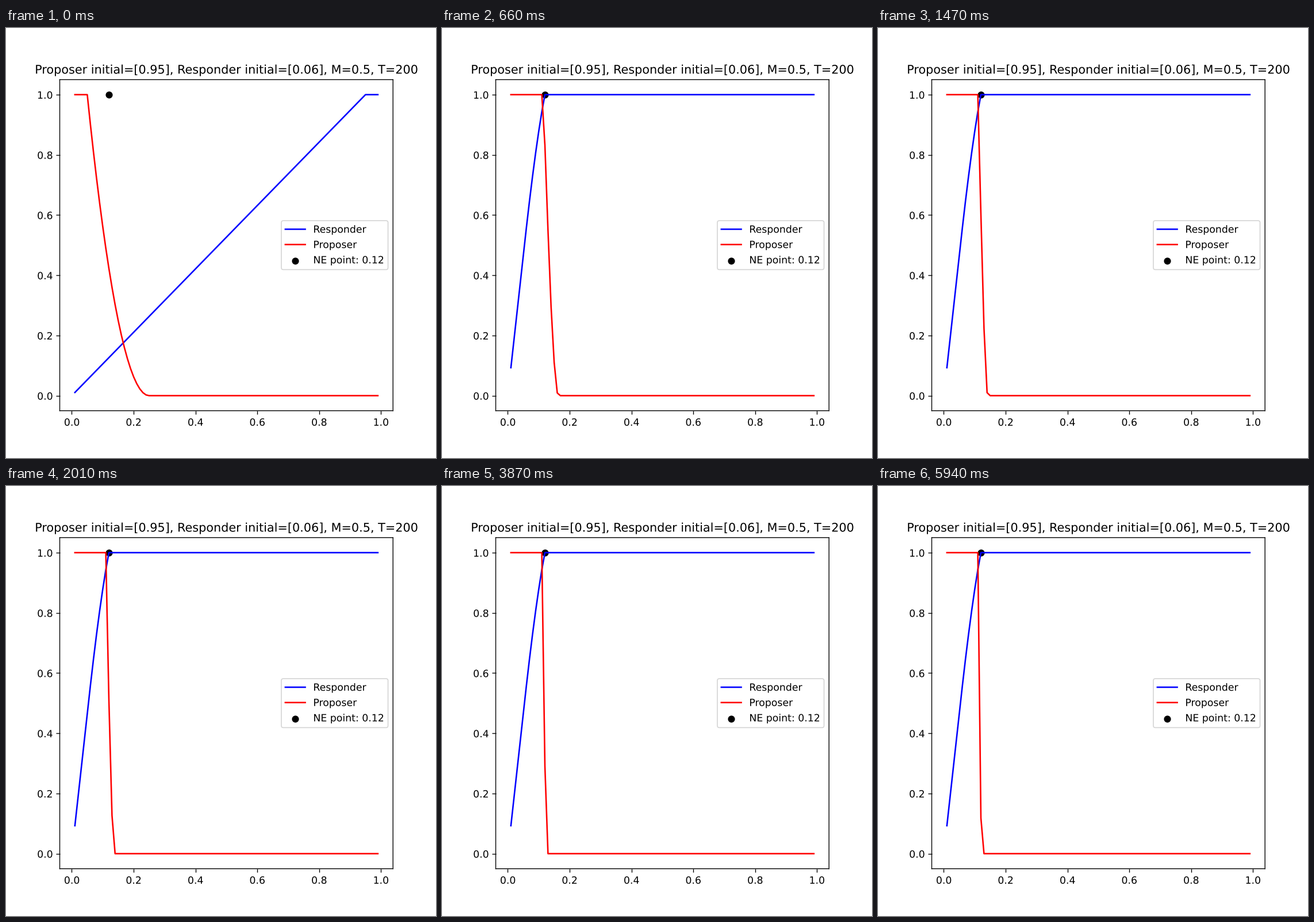
A matplotlib script for the animation above (5970 ms loop, 748 by 748 pixels).

```python
import numpy as np
import matplotlib.pyplot as plt
from matplotlib.animation import FuncAnimation
from matplotlib.patheffects import Normal

SIZE, INCHES = 748, 6
T, M = 200, 0.5
OFFER, THRESHOLD = 0.95, 0.06
NE = 0.12

grid = np.arange(1, 100) / 100


def project(v):
    """Euclidean projection onto the probability simplex."""
    u = np.sort(v)[::-1]
    shift = (np.cumsum(u) - 1) / np.arange(1, len(u) + 1)
    k = np.nonzero(u > shift)[0][-1]
    return np.maximum(v - shift[k], 0)


def pure(value):
    p = np.zeros(len(grid))
    p[round(value * 100) - 1] = 1
    return p


def play():
    """Regularised-leader learning in the ultimatum game."""
    prop, resp = pure(OFFER), pure(THRESHOLD)
    gain_p, gain_r = np.zeros(len(grid)), np.zeros(len(grid))
    accept, exceed = [], []
    for _ in range(T - 1):
        gain_p += (1 - grid) * np.cumsum(resp)
        gain_r += np.cumsum((prop * grid)[::-1])[::-1]
        prop, resp = project(M * gain_p), project(M * gain_r)
        accept.append(np.cumsum(resp))
        exceed.append(1 - np.cumsum(prop))
    return accept, exceed


accept, exceed = play()

# Place outlines and glyphs at sub-pixel positions.
plt.rcParams.update({
    "font.family": "DejaVu Sans",
    "path.snap": False,
    "path.effects": [Normal()],
})
fig, ax = plt.subplots(figsize=(INCHES, INCHES), dpi=SIZE / INCHES)
blue, = ax.plot(grid, accept[0], color="blue", label="Responder")
red, = ax.plot(grid, exceed[0], color="red", label="Proposer")
ax.scatter([NE], [1], color="black", label=f"NE point: {NE}")
ax.set_xlim(-0.039, 1.039)
ax.set_ylim(-0.05, 1.05)
ax.set_title(f"Proposer initial=[{OFFER}], Responder initial=[{THRESHOLD}], "
             f"M={M}, T={T}")
ax.legend(loc="center right")


def update(i):
    blue.set_ydata(accept[i])
    red.set_ydata(exceed[i])
    return blue, red


anim = FuncAnimation(fig, update, frames=T - 1, interval=30,
                     repeat=True, repeat_delay=0)
plt.show()
```
